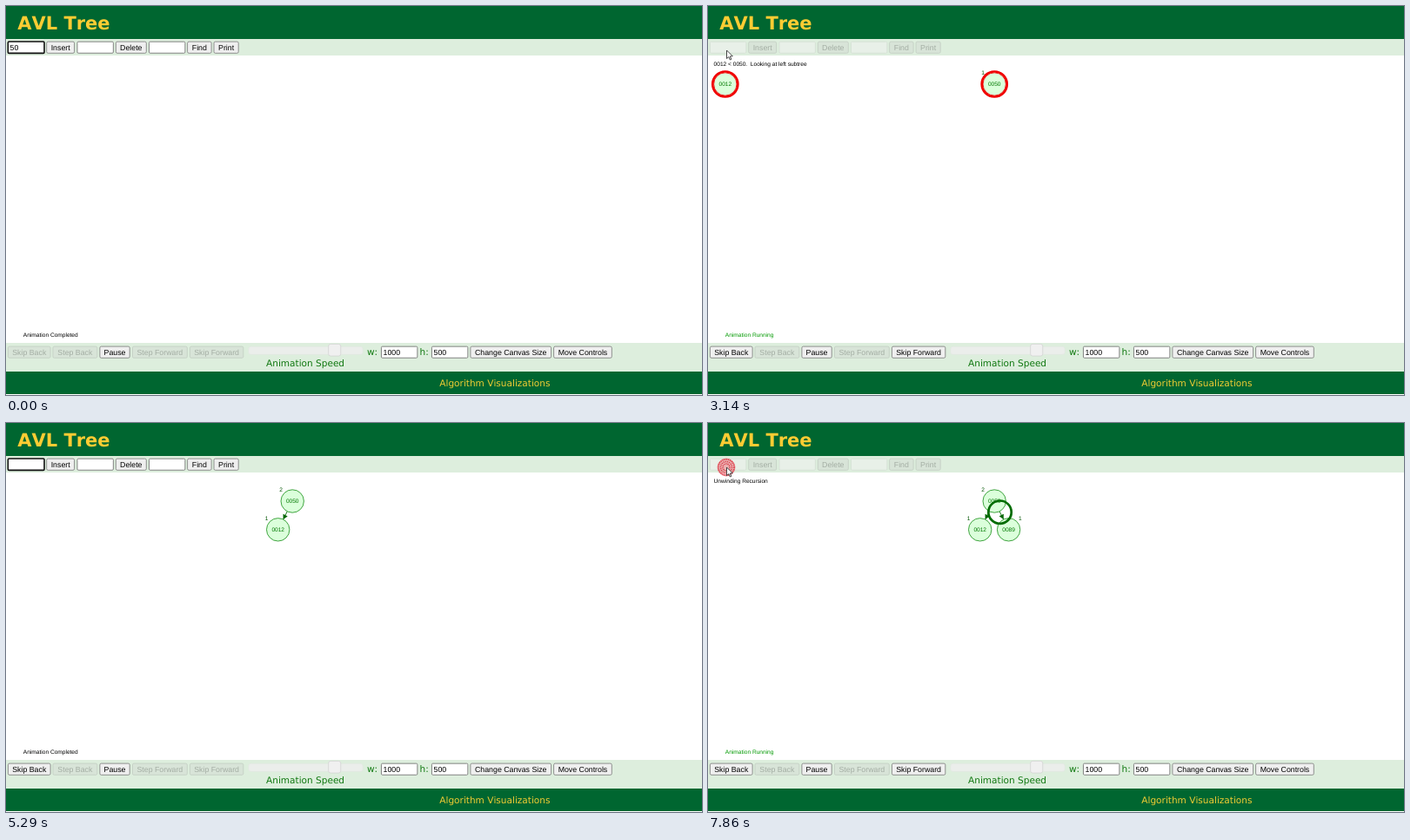
Animation, 800 px wide and 448 px high, one loop 8 s. Source, as an HTML page with a canvas:

```html
<!DOCTYPE html>
<html lang="en">
<head>
<meta charset="utf-8">
<title>AVL Tree</title>
<style>
  html, body { margin: 0; width: 100%; height: 100%; overflow: hidden; background: #fff; }
  canvas { display: block; }
</style>
</head>
<body>
<canvas id="stage" width="800" height="448"></canvas>
<script>
const ctx = document.getElementById('stage').getContext('2d');
const SANS = '"Liberation Sans", Arial, sans-serif';
const WIDE = '"DejaVu Sans", Verdana, sans-serif';
const GREEN = '#006630', BAR = '#ddeedd', LINK = '#007700';
const LOOP = 8000, TICK = 1000 / 7, STEP = 380; // STEP: length of one algorithm step in ms
const R = 13.2;
const ROOT = [329.2, 90], LEFT = [312.7, 122.8], RIGHT = [345.6, 122.8], NEW = [19.8, 90];

const clamp = v => Math.max(0, Math.min(1, v));
const mix = (a, b, p) => a.map((v, i) => v + (b[i] - v) * p);
const progress = (time, start) => clamp((time - start) / STEP);

function rect(x, y, w, h, color) {
  ctx.fillStyle = color;
  ctx.fillRect(x, y, w, h);
}

function text(str, x, y, size, color, { font = SANS, align = 'left', weight = '' } = {}) {
  ctx.font = `${weight} ${size}px ${font}`;
  ctx.textAlign = align;
  ctx.fillStyle = color;
  ctx.fillText(str, x, y);
}

function box(x, y, w, h, fill, border, line = 0.8, radius = 1.6) {
  ctx.beginPath();
  ctx.roundRect(x + line / 2, y + line / 2, w - line, h - line, radius);
  ctx.fillStyle = fill;
  ctx.fill();
  ctx.strokeStyle = border;
  ctx.lineWidth = line;
  ctx.stroke();
}

function button(label, x, right, y, on = true) {
  box(x, y, right - x, 14, on ? '#efefef' : '#d8e4d8', on ? '#777' : '#c2cdc2');
  text(label, (x + right) / 2, y + 10.1, 8.79, on ? '#000' : '#a3ada3', { align: 'center' });
}

function input(x, y, value = '', mode = 'idle') {
  const border = { idle: '#777', hover: '#444', focus: '#101010', off: '#d5e0d5' }[mode];
  const grow = mode === 'focus' ? 0.5 : 0;
  box(x - grow, y - grow, 42.3 + 2 * grow, 14 + 2 * grow,
    mode === 'off' ? '#e8f0e8' : '#fff', border, mode === 'focus' ? 1.6 : 0.9, 1.2);
  text(value, x + 2.5, y + 10.1, 8.79, '#000');
}

function circle([x, y], r, stroke, width, fill) {
  ctx.beginPath();
  ctx.arc(x, y, r, 0, 2 * Math.PI);
  if (fill) {
    ctx.fillStyle = fill;
    ctx.fill();
  }
  ctx.strokeStyle = stroke;
  ctx.lineWidth = width;
  ctx.stroke();
}

function node(pos, value, lit) {
  if (lit) circle(pos, R + 1.3, '#f00000', 2.7);
  circle(pos, R, lit ? '#f00000' : '#2d9a2d', 0.9, '#dbffdb');
  text(value, pos[0], pos[1] + 2.3, 6.59, LINK, { align: 'center' });
}

function height(value, [x, y], color = '#005500') {
  text(value, x, y + 2.3, 6.59, color, { align: 'center' });
}

function link(from, to) {
  const angle = Math.atan2(to[1] - from[1], to[0] - from[0]);
  const length = Math.hypot(to[0] - from[0], to[1] - from[1]);
  if (length <= 2 * R) return;
  ctx.save();
  ctx.translate(...from);
  ctx.rotate(angle);
  ctx.strokeStyle = ctx.fillStyle = '#006600';
  ctx.lineWidth = 0.8;
  ctx.beginPath();
  ctx.moveTo(R, 0);
  ctx.lineTo(length - R, 0);
  ctx.stroke();
  ctx.beginPath();
  ctx.moveTo(length - R, 0);
  ctx.lineTo(length - R - 5.5, -2.9);
  ctx.lineTo(length - R - 5.5, 2.9);
  ctx.fill();
  ctx.restore();
}

const labelSpot = (pos, side = -1) => [pos[0] + side * R, pos[1] - R];

function clickMark(r, alpha) {
  ctx.save();
  ctx.globalAlpha = alpha;
  circle([21, 51], r, '#e8505a', 0.6, 'rgba(240,100,110,.45)');
  ctx.setLineDash([1.3, 0.9]);
  for (const k of [0.9, 0.65, 0.4]) circle([21, 51], r * k, '#d83a48', 1.4);
  ctx.restore();
}

function pointer() {
  ctx.beginPath();
  [[21.5, 51], [21.5, 60.6], [23.8, 58.6], [25.3, 62], [26.8, 61.3], [25.3, 58], [28.3, 57.8]]
    .forEach(p => ctx.lineTo(...p));
  ctx.closePath();
  ctx.fillStyle = '#fff';
  ctx.fill();
  ctx.strokeStyle = '#333';
  ctx.lineWidth = 0.9;
  ctx.stroke();
}

function page(n, running) {
  rect(0, 0, 800, 448, '#fff');
  rect(0, 0, 800, 38, GREEN);
  rect(0, 38, 800, 19, BAR);
  rect(0, 388, 800, 33, BAR);
  rect(0, 421, 800, 26, GREEN);
  text('AVL Tree', 13.2, 27, 21, '#ffcc33', { font: WIDE, weight: 'bold' });
  text('Algorithm Visualizations', 498.3, 438.3, 10.54, '#f0cc33', { font: WIDE });

  const focus = n < 2 || (n >= 16 && n < 18) || n >= 34;
  const value = n < 2 ? '50' : n < 16 ? '' : n < 18 ? '12' : n < 41 ? '' : n < 43 ? '8' : '89';
  const idle = running ? 'off' : 'idle';
  input(2, 40.7, running ? '' : value, running ? 'off' : focus ? 'focus' : 'hover');
  button('Insert', 46.3, 79, 40.7, !running);
  input(81.5, 40.7, '', idle);
  button('Delete', 125.9, 161.7, 40.7, !running);
  input(164, 40.7, '', idle);
  button('Find', 208.2, 236.5, 40.7, !running);
  button('Print', 238.6, 267.6, 40.7, !running);

  button('Skip Back', 2, 51.5, 391.7, n >= 2);
  button('Step Back', 53.5, 105.2, 391.7, false);
  button('Pause', 107.5, 142.6, 391.7);
  button('Step Forward', 145, 208.7, 391.7, false);
  button('Skip Forward', 211, 273.2, 391.7, running);
  box(278.5, 392, 132, 9.6, '#ebeeeb', '#e1e7e1', 0.7, 2.5);
  box(370.3, 389, 14.8, 14.4, '#f0f0f0', '#d0d0d0', 0.7, 2.5);
  const green = { font: WIDE };
  text('Animation Speed', 299, 415.2, 10.54, '#107810', green);
  text('w:', 415, 402.2, 10.54, '#107810', green);
  input(431, 391.7, '1000');
  text('h:', 475.5, 402.2, 10.54, '#107810', green);
  input(489, 391.7, '500');
  button('Change Canvas Size', 533.5, 627, 391.7);
  button('Move Controls', 629.2, 696.7, 391.7);

  text(running ? 'Animation Running' : 'Animation Completed', 19.8, 381.3, 6.59,
    running ? '#009900' : '#000');
}

// One insertion below the root; ticks give the start of each phase.
function insertion(n, time, plan) {
  const { begin, compare, moveAt, value, target, side, sign } = plan;
  const unwindAt = moveAt + STEP;
  const lit = n >= compare && time < moveAt;
  const pos = mix(NEW, target, progress(time, moveAt));
  const linked = time >= moveAt;
  const unwinding = time >= unwindAt && n < plan.adjust;
  if (linked) link(ROOT, pos);
  const message = n < compare ? 'Inserting ' + value
    : lit ? `${value} ${sign} 0050.  Looking at ${side < 0 ? 'left' : 'right'} subtree`
    : !unwinding && n < plan.adjust ? 'Found null tree, inserting element'
    : unwinding ? 'Unwinding Recursion'
    : n < plan.end ? 'Adjusting height after recursive call' : '';
  return {
    message, lit, unwinding,
    draw() {
      if (n < begin) return;
      node(pos, value, lit);
      if (linked) {
        height('1', mix(labelSpot(NEW), labelSpot(target, side), progress(time, moveAt)));
      }
    },
    ring: mix(target, ROOT, progress(time, unwindAt))
  };
}

const plans = [
  { begin: 18, compare: 20, moveAt: 3227, adjust: 29, end: 31,
    value: '0012', target: LEFT, side: -1, sign: '<' },
  { begin: 46, compare: 49, moveAt: 7244, adjust: 99, end: 99,
    value: '0089', target: RIGHT, side: 1, sign: '>=' }
];

function tree(n, time) {
  const active = plans.filter(p => n >= p.begin).map(p => insertion(n, time, p));
  const last = active[active.length - 1];
  const adjusting = n >= 29 && n < 31;
  if (n >= 2) {
    node(ROOT, '0050', last && last.lit);
    active.forEach(a => a.draw());
    height(n < 29 ? '1' : '2', labelSpot(ROOT), adjusting ? '#ff0000' : '#005500');
  }
  if (last && last.unwinding) circle(last.ring, R, '#006c00', 2.7);
  const message = last ? last.message : n >= 2 && n < 5 ? 'Inserting 0050' : '';
  text(message, message.startsWith('Inserting') ? 8.1 : 6.6, 69, 6.59, '#000');
}

function frame(now) {
  const n = Math.floor((now % LOOP) / TICK + 0.05) % 56;
  const running = (n >= 2 && n < 5) || (n >= 18 && n < 31) || n >= 46;
  ctx.textRendering = 'geometricPrecision';
  ctx.fontKerning = 'none';
  page(n, running);
  tree(n, n * TICK);
  if (n >= 34 && n < 37) clickMark(8, 1 - (n - 34) * 0.3);
  if (n === 55) clickMark(10, 1);
  if (running) pointer();
}

const start = performance.now();
function loop() {
  frame(performance.now() - start);
  requestAnimationFrame(loop);
}
loop();
</script>
</body>
</html>
```
